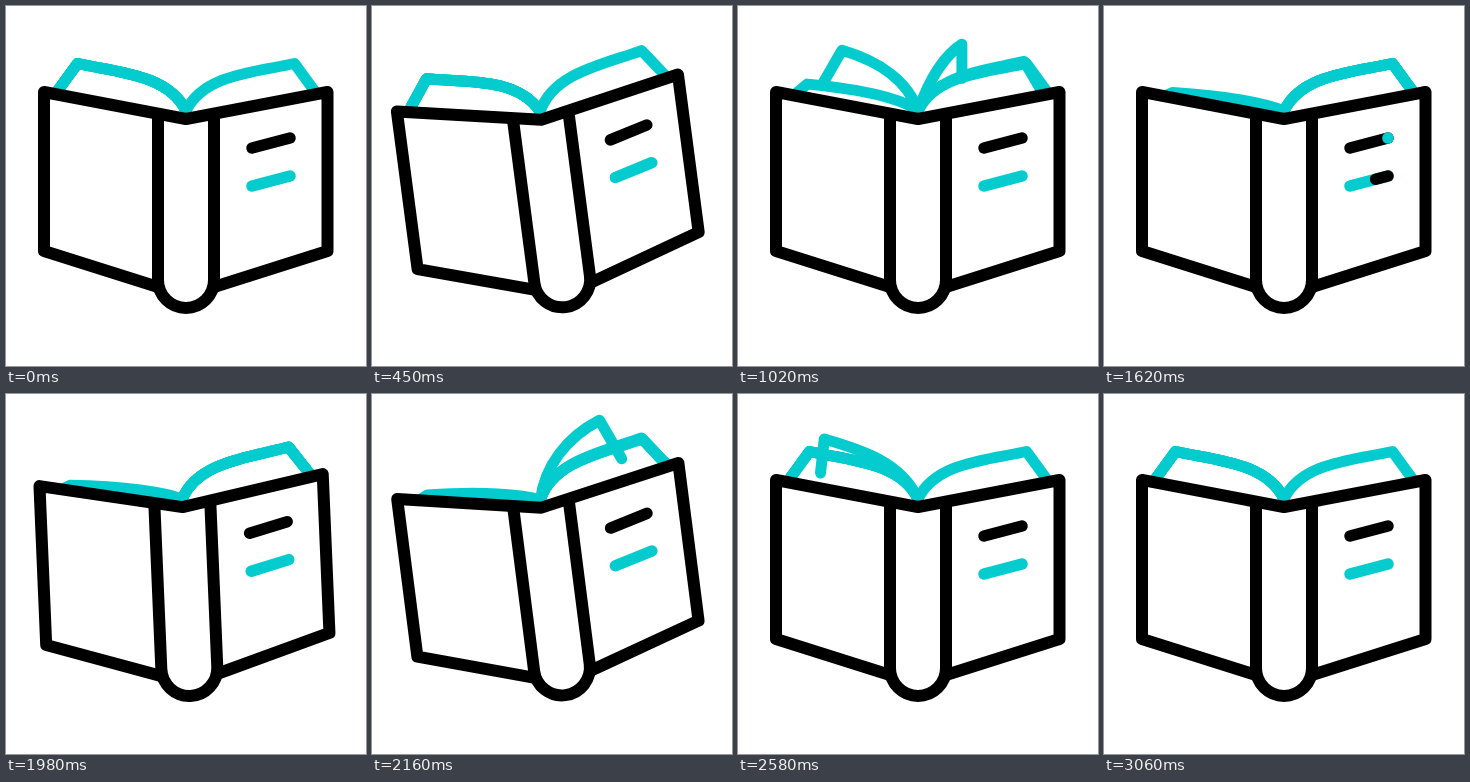
An HTML page that plays this animation: 360x360 px, repeating every 3090 ms.

```html
<!DOCTYPE html>
<html lang="en">
<head>
<meta charset="utf-8">
<title>Open book</title>
<style>
  html, body { margin: 0; width: 100%; height: 100%; overflow: hidden; background: #fff; }
  svg { display: block; width: 100vw; height: 100vh; }
  path { fill: none; stroke: #000; stroke-linecap: round; stroke-linejoin: round; }
  .page { stroke-width: 11; }
  .cover { stroke-width: 12; }
  .line { stroke-width: 11.5; }
  .teal { stroke: #04cbce; }
  .panel { fill: #fff; stroke: none; }
</style>
</head>
<body>
<svg viewBox="0 0 360 360">
  <g id="book">
    <path class="page teal" id="leftStack"/>
    <path class="page teal" id="rightStack"/>
    <path class="page teal flip"/>
    <path class="page teal flip"/>
    <path class="page teal flip"/>
    <path class="panel" d="M180 113 38 86V245L152 281H208L321.500 245V86Z"/>
    <path class="cover" d="M152 110V274A28 28 0 0 0 208 274V110"/>
    <path class="cover" d="M152 281 38 245V86L180 113 321.500 86V245L208 281"/>
    <path class="line" d="M246 142 284 132"/>
    <path class="line teal" d="M246 180 284 170"/>
    <path class="line teal swap"/>
    <path class="line swap"/>
  </g>
</svg>
<script>
const LOOP = 3090;
const FLIP = 480, STAGGER = 120;
const FORWARD_AT = 620, BACK_AT = 1990;
const FORWARD_LIFT = 22, BACK_LIFT = 35;
const TILT = 7.7;

// Resting page, measured from the hinge.
const HINGE_X = 180, HINGE_Y = 105;
const REACH = 108.5, FLARE = 21.5, TIP_Y = 57.5, EDGE_Y = 87;

const book = document.getElementById('book');
const leftStack = document.getElementById('leftStack');
const rightStack = document.getElementById('rightStack');
const flips = [...document.querySelectorAll('.flip')];
const swaps = [...document.querySelectorAll('.swap')];

const ease = (t, start, end) => {
  const u = Math.min(1, Math.max(0, (t - start) / (end - start)));
  return (1 - Math.cos(Math.PI * u)) / 2;
};

// A curve from the hinge to the tip, then the outer edge; curl rounds the curve.
function drawPage(el, tip, edge, curl, bow = 0) {
  const dx = tip.x - HINGE_X, dy = tip.y - HINGE_Y;
  const at = (fx, fy) => `${HINGE_X + bow + fx * dx} ${HINGE_Y + fy * dy}`;
  const near = at(.16, .4 + .38 * curl);
  const far = at(.5 + .15 * curl, .82);
  el.setAttribute('d',
    `M${HINGE_X} ${HINGE_Y}C${near} ${far} ${tip.x} ${tip.y}L${edge.x} ${edge.y}`);
}

// dir is 1 for left to right, -1 for right to left; s runs from 0 to 1.
function drawFlip(el, s, dir, lift) {
  const c = Math.cos(Math.PI * s), h = Math.sin(Math.PI * s);
  const tip = {
    x: HINGE_X - dir * REACH * c,
    y: TIP_Y - lift * Math.max(0, h) ** 1.5
  };
  // The outer edge trails the tip and swings out only on landing.
  const swing = c > 0 ? Math.sqrt(c) : -(c ** 12);
  const edge = { x: tip.x - dir * FLARE * swing, y: EDGE_Y - 16 * h };
  drawPage(el, tip, edge, c ** 4, dir * 3 * h);
}

function drawLeftStack(sink) {
  const tip = { x: HINGE_X - REACH - 3 * sink, y: TIP_Y + 29 * sink };
  const edge = { x: tip.x - FLARE + 9 * sink, y: EDGE_Y + 5 * sink };
  drawPage(leftStack, tip, edge, 1 - sink);
}

// Each overlay grows from the left end, then leaves toward the right end.
function drawSwap(el, t, delay, y) {
  const head = ease(t, 1160 + delay, 1390 + delay);
  const tail = ease(t, 1400 + delay, 1630 + delay);
  const at = k => `${246 + 38 * k} ${y - 10 * k}`;
  el.style.display = head > 0 && tail < 1 ? '' : 'none';
  el.setAttribute('d', `M${at(tail)}L${at(head)}`);
}

function draw(t) {
  const tilt = ease(t, 210, 480) - ease(t, 480, 690)
             + ease(t, 1890, 2130) - ease(t, 2130, 2340);
  book.setAttribute('transform', `rotate(${-TILT * tilt} 180 196)`);

  flips.forEach((el, i) => {
    const out = FORWARD_AT + i * STAGGER;
    const home = BACK_AT + (2 - i) * STAGGER;
    if (t < home) drawFlip(el, ease(t, out, out + FLIP), 1, FORWARD_LIFT);
    else drawFlip(el, ease(t, home, home + FLIP), -1, BACK_LIFT);
  });

  drawLeftStack(ease(t, 740, 1180) - ease(t, 2120, 2560));
  drawSwap(swaps[0], t, 0, 142);
  drawSwap(swaps[1], t, 80, 180);
}

drawFlip(rightStack, 0, -1, 0);

const begin = performance.now();
function tick() {
  draw((performance.now() - begin) % LOOP);
  requestAnimationFrame(tick);
}
tick();
</script>
</body>
</html>
```
